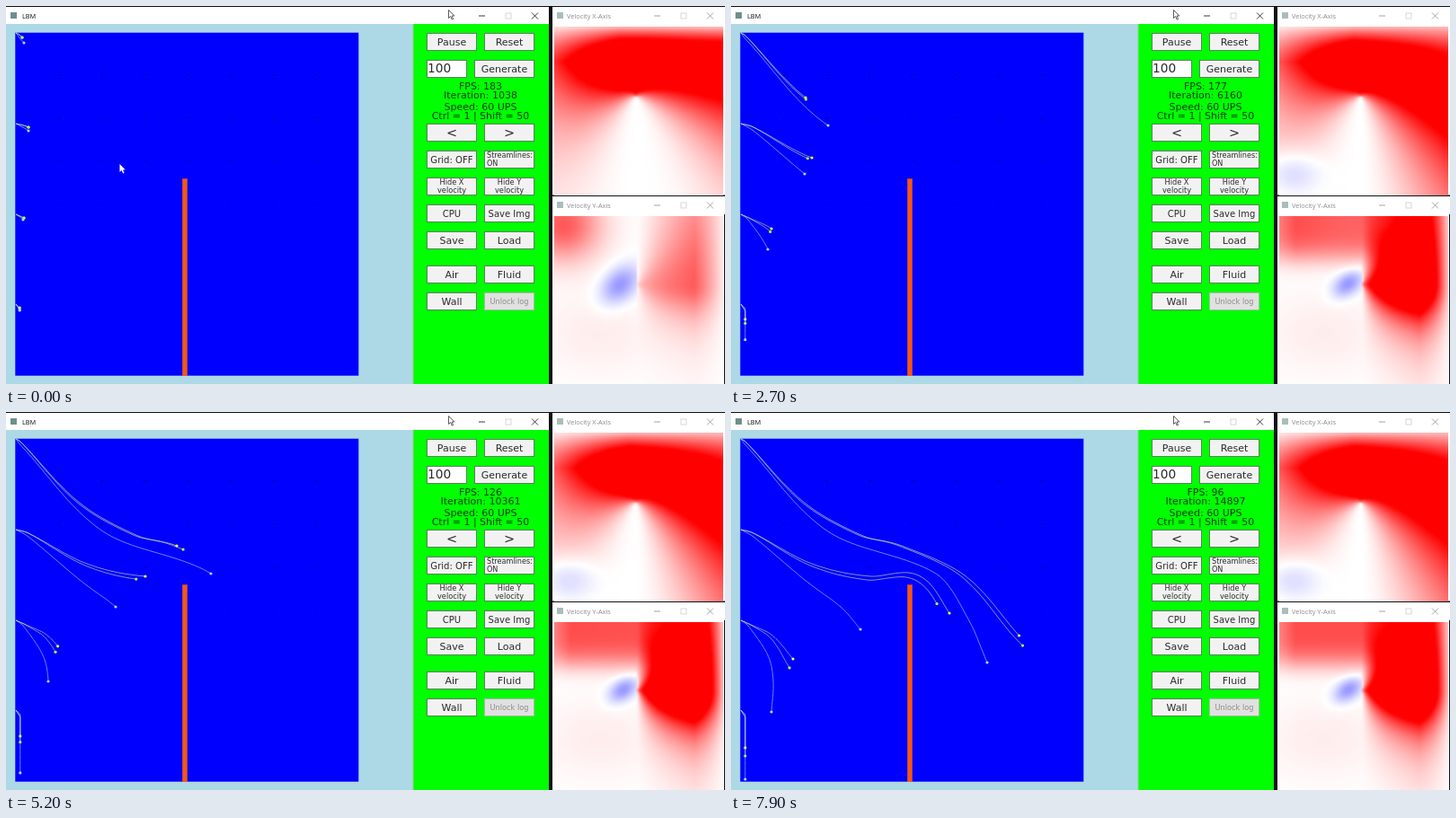
Write an HTML page with a canvas that moves like this. It is 800x421 px and loops after 8 s.

```html
<!DOCTYPE html>
<html lang="en">
<head>
<meta charset="utf-8">
<title>LBM</title>
<style>
html, body { margin: 0; width: 100%; height: 100%; overflow: hidden; background: #111116; }
#stage { position: relative; width: 800px; height: 421px; overflow: hidden; }
svg, canvas { position: absolute; left: 0; top: 0; }
canvas { left: 610px; width: 188px; height: 188px; }
#fieldX { top: 23px; }
#fieldY { top: 234px; }
text { font-family: "DejaVu Sans", sans-serif; fill: #2b2b2b; }
.title { font-family: "Open Sans", sans-serif; font-size: 7.4px; fill: #111; }
.dim { fill: #8a8a8a; }
.readout { font-size: 11px; text-anchor: middle; fill: #103c10; }
</style>
</head>
<body>
<div id="stage">
  <svg id="scene" width="800" height="421" viewBox="0 0 800 421"></svg>
  <canvas id="fieldX" width="94" height="94"></canvas>
  <canvas id="fieldY" width="94" height="94"></canvas>
</div>
<script>
const LOOP = 8, STEP = .1;
const scene = document.getElementById("scene");
const mix = (a, b, k) => a + (b - a) * k;

function add(tag, attrs, content) {
  const el = document.createElementNS("http://www.w3.org/2000/svg", tag);
  for (const key in attrs) el.setAttribute(key, attrs[key]);
  if (content) el.textContent = content;
  scene.appendChild(el);
  return el;
}
const rect = (x, y, width, height, fill, more) => add("rect", { x, y, width, height, fill, ...more });

// Windows
function titleBar(x, y, w, h, name, active) {
  const mid = y + 9.5, end = x + w - (active ? 19 : 20), gap = 29.5;
  rect(x, y, w, h, "#fff");
  rect(x + 5, mid - 3.5, 7, 7, active ? "#6f8f8c" : "#a9bdba");
  add("text", { x: x + (active ? 18 : 16), y: mid + 3, class: active ? "title" : "title dim" }, name);
  add("path", {
    d: `M${end - 2 * gap} ${mid + .5}h7 M${end} ${mid - 3}l7 7m0-7l-7 7`,
    stroke: active ? "#222" : "#999", fill: "none", "stroke-width": .9
  });
  rect(end - gap + .5, mid - 2.5, 6, 6, "none", { stroke: "#ccc", "stroke-width": .8 });
}

rect(0, 20, 453, 401, "#add8e6");
rect(453, 20, 151, 401, "#00ff00");
rect(452.5, 20, 1, 401, "#9fc9a8");
titleBar(0, 1, 604, 19, "LBM", true);
titleBar(608, 1, 192, 20, "Velocity X-Axis", false);
titleBar(608, 212, 192, 20, "Velocity Y-Axis", false);
rect(608, 21, 192, 189.5, "#fff");
rect(608, 232, 191, 189, "#fff");

// Basin with faint marks and the wall
const BOX = { x: 10.3, y: 29.7, size: 382 };
rect(BOX.x, BOX.y, BOX.size, BOX.size, "#0000ff");
for (let row = 1; row <= 5; row++) {
  for (let col = 1; col <= 7; col++) {
    const cell = BOX.size / 8;
    rect(BOX.x + col * cell - 1, BOX.y + row * cell - 1, 3.5, 1.5, "#000070", { opacity: .75 - .13 * row });
  }
}
rect(196.3, 192.3, 5.4, 219.7, "#fb5510");
add("path", { d: "M196.6 192.5V412M201.4 192.5V412", stroke: "#a0665a", "stroke-width": .8, "stroke-dasharray": "1 1" });

// Controls
function button(x, y, w, label, size) {
  const off = label === "Unlock log", lines = label.split("\n");
  const left = lines[1] === "ON";
  rect(x + .5, y + .5, w - 1, 19, off ? "#e1e1e1" : "#f2f2f2", { stroke: off ? "#a9b9a9" : "#5f7f5f" });
  lines.forEach((line, i) => add("text", {
    x: left ? x + 3 : x + w / 2,
    y: lines.length > 1 ? y + 8 + i * 9.3 : y + 10 + size * .365,
    "font-size": size,
    "text-anchor": left ? "start" : "middle",
    style: off ? "fill:#8c8c8c" : ""
  }, line));
}
const ROWS = [
  [30, "Pause", 11, "Reset", 11],
  [131, "<", 14.5, ">", 14.5],
  [161, "Grid: OFF", 10.1, "Streamlines:\nON", 8.1],
  [191, "Hide X\nvelocity", 8.2, "Hide Y\nvelocity", 8.2],
  [221, "CPU", 10, "Save Img", 10],
  [251, "Save", 11, "Load", 11],
  [289, "Air", 11, "Fluid", 11],
  [319, "Wall", 11, "Unlock log", 8.2]
];
for (const [y, a, sizeA, b, sizeB] of ROWS) {
  button(468, y, 56, a, sizeA);
  button(532, y, 56, b, sizeB);
}
rect(468.5, 60.5, 44, 19, "#fff", { stroke: "#5f7f5f" });
add("text", { x: 469, y: 74, "font-size": 13.7 }, "100");
button(521, 60, 67, "Generate", 11);

const readout = (y, s) => add("text", { x: 528, y, class: "readout" }, s);
const fpsText = readout(93, "FPS");
const iterText = readout(103, "Iteration");
readout(115.5, "Speed: 60 UPS");
readout(125.5, "Ctrl = 1 | Shift = 50");

// Smooth path through a few [time, x, y] points
function spline(keys) {
  const last = keys.length - 1;
  const slope = (n, c) => {
    const a = keys[Math.max(0, n - 1)], b = keys[Math.min(last, n + 1)];
    return (b[c] - a[c]) / (b[0] - a[0]);
  };
  return t => {
    let i = 0;
    while (i < last - 1 && t > keys[i + 1][0]) i++;
    const span = keys[i + 1][0] - keys[i][0], u = (t - keys[i][0]) / span;
    return [1, 2].map(c => {
      const a = keys[i][c], b = keys[i + 1][c], m = slope(i, c) * span, n = slope(i + 1, c) * span;
      return a + u * (m + u * (3 * (b - a) - 2 * m - n + u * (2 * (a - b) + m + n)));
    });
  };
}

// A neighbour follows the same path, shifting in time and place as it goes
const follow = (path, lead, dx, dy) => t => {
  const k = Math.max(0, t / LOOP), [x, y] = path(t + lead * k);
  return [x + dx * k, y + dy * k];
};
// Along the left wall the flow only sinks, down to the floor
const sink = (y, speed) => t => [
  mix(11, 15.8, Math.min(1, (t - RELEASE) / .8)),
  Math.min(409, t < 0 ? mix(332, y, 1 - t / RELEASE) : y + speed * t)
];

const RELEASE = -.7;
const INK = ["#ffff30", "#adff2f", "#add8e6"];
const particles = [];
function group(...paths) {
  paths.forEach((at, kind) => particles.push({
    at,
    line: add("path", { fill: "none", stroke: kind < 2 ? "#d2eba0" : INK[2], "stroke-width": .8, "stroke-opacity": .78 }),
    head: add("circle", { r: 1.6, fill: INK[kind] })
  }));
}

const top1 = spline([[RELEASE, 11, 30], [0, 18, 35], [2.7, 83, 102], [4.4, 147, 138], [5.2, 190, 149], [6.3, 260, 182], [7.9, 320.5, 249]]);
const top2 = spline([[RELEASE, 11, 30], [0, 20, 41], [2.7, 108, 133], [5.2, 228, 180], [6.3, 262, 227], [7.9, 285, 279]]);
group(top1, follow(top1, .3, -8, -1), top2);

const over = spline([[RELEASE, 11, 131], [0, 25, 135], [2.7, 90, 169], [5.2, 155, 183], [6.3, 198, 179], [7.05, 221, 191], [7.9, 243, 224]]);
const under = spline([[RELEASE, 11, 131], [0, 25, 139], [2.7, 82, 187], [5.2, 122, 217], [7.9, 144, 242]]);
group(over, follow(over, -.4, -4, 6), under);

const low1 = spline([[RELEASE, 11, 232], [0, 20, 236], [2.7, 45, 248], [7.9, 69, 275]]);
const low2 = spline([[RELEASE, 11, 232], [0, 19, 238], [2.7, 41, 271], [5.2, 47, 300], [7.9, 45, 334]]);
group(low1, follow(low1, 0, -4, 10), low2);

group(sink(336, 4.8), sink(338, 5.7), sink(339, 12.1));

function drawParticle({ at, line, head }, t) {
  const trail = [];
  for (let s = RELEASE; s < t + STEP / 2; s += STEP) trail.push(at(s).map(v => v.toFixed(1)));
  line.setAttribute("d", "M" + trail.join("L"));
  const [x, y] = at(t);
  head.setAttribute("cx", x);
  head.setAttribute("cy", y);
}

// Velocity fields, shaped by distance and angle around the wall's tip
const SIZE = 94, EXTENT = 188;
const bell = (dx, dy, sx, sy) => Math.exp(-((dx / sx) ** 2 + (dy / sy) ** 2));
const polar = (dx, dy) => [Math.hypot(dx, dy), Math.abs(Math.atan2(dx, dy))];

function flowX(x, y, k) {
  const dx = x - 91, [r, angle] = polar(dx, y - 78);
  const power = dx < 0 ? 2.4 : mix(2.8, 1.7, k);
  const inlet = Math.min(1, mix(.45, .36, k) + .0077 * x);
  const lid = Math.min(1, .1 + y * (.023 - .012 * k * (x / EXTENT) ** 2));
  const eddy = .24 * k * bell(x - 15, y - 163, 32, 26);
  return .57 * r ** .35 * Math.sin(angle / 2) ** power * inlet * lid - eddy;
}

function flowY(x, y, k) {
  const dx = x - 92, dy = y - 76, [r, angle] = polar(dx, dy);
  const band = .7 * k * Math.exp(-((y / 50) ** 4)) * Math.min(1, .7 + x / 60);
  const corner = .65 * (1 - k) * bell(x - 10, y - 10, 42, 40);
  const haze = .07 * bell(x - 50, y - 130, 70, 45);
  const base = band * (dx > 0 ? bell(dx, 0, 30, 1) : 1) + corner + haze;
  if (dx < 0) return base - .42 * bell(dx + mix(19, 15, k), dy + .35 * (dx + 17), mix(21, 16, k), mix(20, 13, k));
  const floor = 1 / (1 + (Math.max(0, dy) / 38) ** 2);
  const side = .1 + .9 * Math.min(1, (EXTENT - x) / 32);
  return base + mix(.3, 1, k) * .5 * r ** .35 * Math.sin(angle) ** 1.15 * floor * side;
}

function drawField(id, flow, k) {
  const ctx = document.getElementById(id).getContext("2d");
  const img = ctx.createImageData(SIZE, SIZE), scale = EXTENT / SIZE;
  for (let i = 0; i < SIZE * SIZE; i++) {
    const v = flow((i % SIZE + .5) * scale, (Math.floor(i / SIZE) + .5) * scale, k);
    const light = 255 * (1 - Math.abs(v));
    img.data.set([v < 0 ? light : 255, light, v < 0 ? 255 : light, 255].map(c => Math.max(0, c)), i * 4);
  }
  ctx.putImageData(img, 0, 0);
}

// Pointers
const ARROW = "v9l2.1-2 1.6 3.6 1.4-.6-1.6-3.5h2.8z";
const pointer = add("path", { d: "M126.5 176" + ARROW, fill: "#fff" });
add("path", { d: "M492.5 4.5" + ARROW, fill: "#fff", stroke: "#333", "stroke-width": .8 });

// The rate climbs briefly, then falls as the trails grow
const fps = t => t < 1.4 ? mix(183, 224, t / 1.4) : 224 / (1 + .206 * (t - 1.4));
const iteration = t => Math.min(1038 + 2098 * t, 1623 + 1680.3 * t);

function render(t) {
  fpsText.textContent = "FPS: " + Math.round(fps(t));
  iterText.textContent = "Iteration: " + Math.round(iteration(t));
  pointer.style.display = t < STEP ? "" : "none";
  for (const p of particles) drawParticle(p, t);
  drawField("fieldX", flowX, 1 - Math.exp(-t / .5));
  drawField("fieldY", flowY, 1 - Math.exp(-t / 1.3));
}

const start = performance.now();
let shown = -1;
function tick() {
  const frame = Math.floor((performance.now() - start) / 1000 % LOOP / STEP);
  if (frame !== shown) render((shown = frame) * STEP);
  requestAnimationFrame(tick);
}
tick();
</script>
</body>
</html>
```
